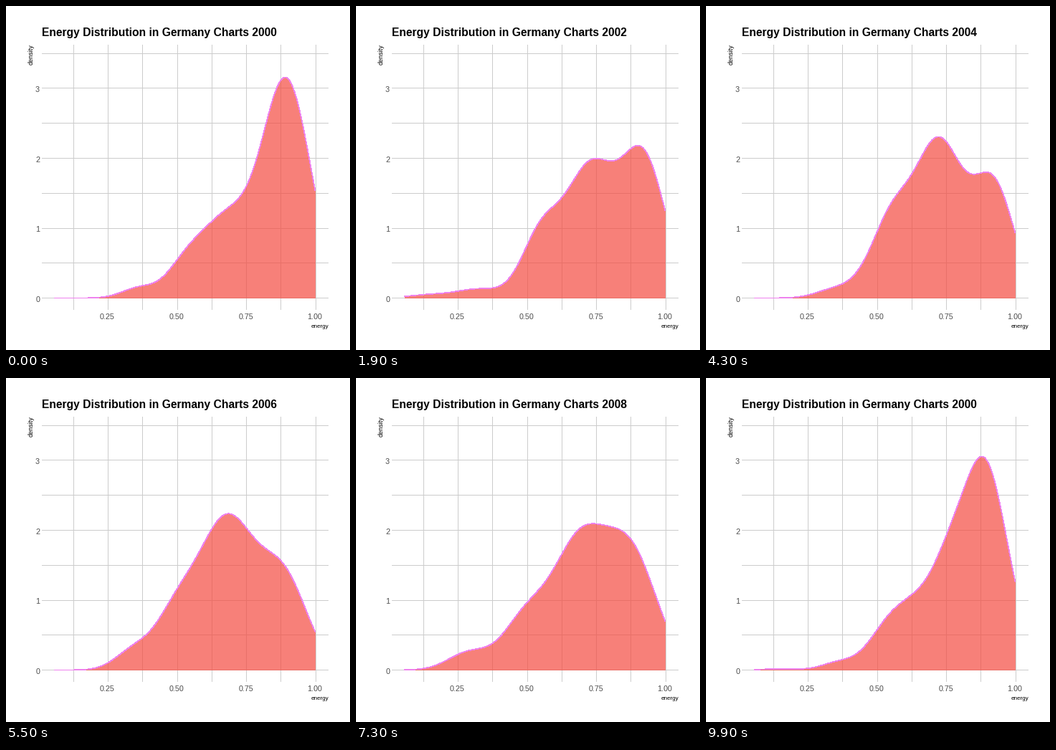
Animation of 480x480 px, one loop 10 s. Source, as a matplotlib script:

```python
import numpy as np
import matplotlib.pyplot as plt
from matplotlib.animation import FuncAnimation
from matplotlib.patches import Polygon

SIZE, DPI = 480, 100
PT = 72 / DPI
FONT = "Liberation Sans"
GRID, FILL, OUTLINE = "#cccccc", "#f44b40", "#ee82ee"
FIRST, LAST = 2000, 2010
XS = np.linspace(0.0585, 0.999, 512)


def px(x):
    return 45.65 + 386.1 * x


def py(d):
    return 407.5 - 97.6 * d


def bumps(*parts):
    """Sum of bell curves given as (height, centre, spread)."""
    return sum(h * np.exp(-((XS - c) / s) ** 2 / 2) for h, c, s in parts)


KNOWN = {
    2000: bumps((3.09, .895, .088), (1.08, .68, .09), (.43, .53, .07), (.14, .36, .06)),
    2001: bumps((2.2, .895, .1), (1.22, .655, .11), (.25, .51, .06),
                (.25, .32, .08), (.09, .14, .07)),
    2003: bumps((2.35, .73, .08), (1.96, .928, .072), (1.08, .555, .065)),
    2006: bumps((2.15, .68, .105), (1.2, .89, .085), (.66, .49, .075), (.26, .34, .065)),
    2008: bumps((1.8, .69, .1), (1.55, .88, .093), (.67, .49, .08), (.25, .29, .075)),
    2009: bumps((3.25, .832, .071), (1.85, .68, .07), (.52, .485, .047), (.1, .33, .045)),
    2010: bumps((2.4, .88, .065), (2.5, .765, .06), (.98, .58, .09), (.07, .15, .06)),
}


def density(year):
    """Curve of a year; years without bumps lie between their neighbours."""
    before = max(y for y in KNOWN if y <= year)
    after = min(y for y in KNOWN if y >= year)
    t = (year - before) / max(after - before, 1)
    return (1 - t) * KNOWN[before] + t * KNOWN[after]


# First changed frame and number of steps of each transition
STARTS = [5, 15, *range(25, 98, 9)]
STEPS = [5, 5] + [4] * 9

fig = plt.figure(figsize=(SIZE / DPI, SIZE / DPI), dpi=DPI, facecolor="white")
ax = fig.add_axes([0, 0, 1, 1])
ax.set(xlim=(0, SIZE), ylim=(SIZE, 0))
ax.axis("off")


def label(x, y, text, size, color="black", ha="right", va="baseline", **kw):
    return ax.text(x, y, text, fontsize=size * PT, color=color, family=FONT,
                   ha=ha, va=va, **kw)


def rule(xs, ys):
    ax.plot(xs, ys, color=GRID, lw=PT, snap=False, solid_capstyle="butt", zorder=1)


for i in range(1, 9):
    col = round(px(i / 8) - 0.15) + 0.5
    rule([col, col], [54, 424])
for i in range(8):
    row = round(py(i / 2) - 0.4) + 0.5
    rule([50, 450], [row, row])

for i in range(4):
    x = (i + 1) / 4
    label(px(x) - 0.7, 437, f"{x:.2f}", 10.8, "#4d4d4d", ha="center")
    label(47, py(i) + 5.4, str(i), 10.8, "#4d4d4d")
label(450, 449, "energy", 8.2)
label(39.5, 53.5, "density", 9, rotation=90, va="top")
title = label(50, 42, "", 15.6, ha="left", weight="bold")

area = Polygon([[0, 0]], closed=True, fc=FILL, alpha=0.7, lw=0,
               antialiased=False, zorder=2)
ax.add_patch(area)
edge, = ax.plot([], [], color=OUTLINE, lw=0.7 * PT, antialiased=False, zorder=3)


def state(n):
    """Density curve and year shown at frame n."""
    i = sum(n >= s for s in STARTS) - 1
    if i < 0:
        return density(FIRST), FIRST
    t = min((n - STARTS[i] + 1) / STEPS[i], 1)
    year = FIRST + i
    following = year + 1 if year < LAST else FIRST
    curve = (1 - t) * density(year) + t * density(following)
    return curve, following if t >= 0.5 else year


def update(n):
    curve, year = state(n)
    x, y = px(XS), py(curve)
    area.set_xy(np.r_[np.c_[x, y], [[x[-1], py(0)], [x[0], py(0)]]])
    edge.set_data(x, y)
    title.set_text(f"Energy Distribution in Germany Charts {year}")
    return area, edge, title


anim = FuncAnimation(fig, update, frames=100, interval=100, repeat=True,
                     repeat_delay=0)
plt.show()
```
